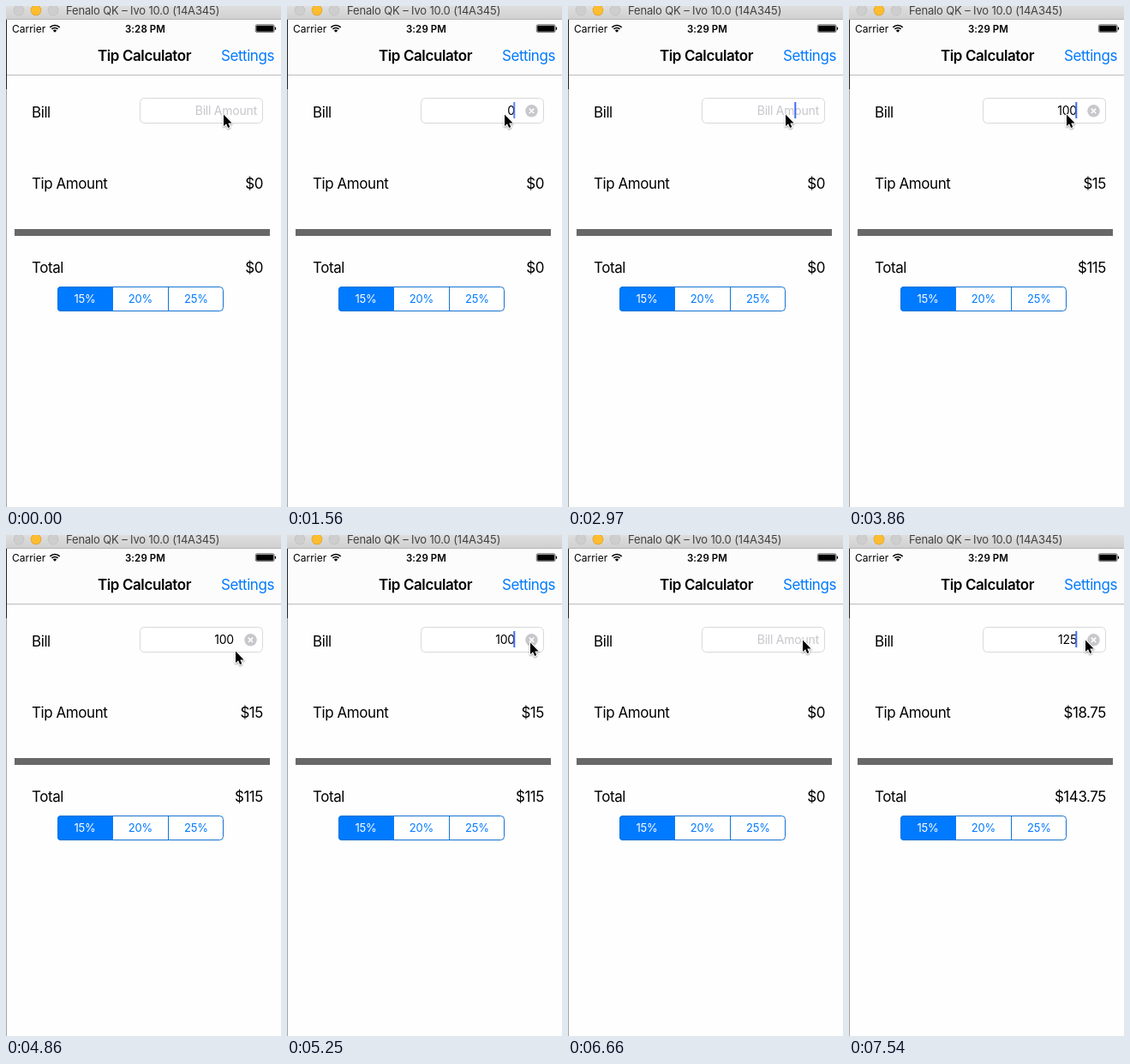
Recreate the animation shown at these times as an HTML page with a canvas. Size 321x584 px, loop 8000 ms.

```html
<!DOCTYPE html>
<html lang="en">
<head>
<meta charset="utf-8">
<title>Tip Calculator</title>
<style>
  html, body { margin: 0; width: 100%; height: 100%; overflow: hidden; background: #fff; }
  canvas { display: block; width: 321px; height: 584px; }
</style>
</head>
<body>
<canvas id="stage" width="321" height="584"></canvas>
<script>
const ctx = document.getElementById("stage").getContext("2d");
const LOOP = 8000;
const BLUE = "#007aff";

// Bill text over time: [start, typed]
const typing = [
  [0, ""], [1030, "0"], [2970, ""], [3080, "1"], [3260, "10"], [3800, "100"],
  [5950, ""], [6830, "1"], [7070, "12"], [7540, "125"]
];
// Caret opacity ramps: [start, end, opacity reached]
const blinks = [
  [0, 0, 0], [180, 270, 1], [650, 800, 0], [1030, 1030, 1], [1530, 1730, 0],
  [2050, 2130, 1], [2520, 2730, 0], [2970, 2970, 1], [4440, 4640, 0],
  [4980, 5070, 1], [5390, 5540, 0], [5850, 5950, 1], [6360, 6550, 0], [6830, 6830, 1]
];
// Pointer tip: [time, x, y]
const pointerPath = [
  [0, 253, 125], [4460, 253, 125], [4860, 267, 134], [5020, 271, 134],
  [5250, 283, 124], [5480, 286, 123], [6370, 286, 123],
  [6640, 273, 121], [6700, 273, 121], [6830, 275, 121], [LOOP, 275, 121]
];

function currentText(t) {
  return typing.filter(([start]) => start <= t).pop()[1];
}

function caretOpacity(t) {
  let level = 0;
  for (const [start, end, to] of blinks) {
    if (t < start) break;
    const k = end > start ? Math.min(1, (t - start) / (end - start)) : 1;
    level += (to - level) * k;
  }
  return level;
}

function pointerAt(t) {
  const i = Math.max(1, pointerPath.findIndex(([time]) => time > t));
  const [t0, x0, y0] = pointerPath[i - 1];
  const [t1, x1, y1] = pointerPath[i];
  const k = (t - t0) / (t1 - t0);
  return [Math.round(x0 + (x1 - x0) * k), Math.round(y0 + (y1 - y0) * k)];
}

function text(str, x, y, { size = 17, weight = 400, color = "#000", align = "left", track = -0.43 } = {}) {
  ctx.font = `${weight} ${size}px Inter, "Liberation Sans", sans-serif`;
  ctx.letterSpacing = track + "px";
  ctx.textAlign = align;
  ctx.fillStyle = color;
  ctx.fillText(str, x, y);
}

function rect(x, y, w, h, color) {
  ctx.fillStyle = color;
  ctx.fillRect(x, y, w, h);
}

function roundBox(x, y, w, h, r) {
  ctx.beginPath();
  ctx.roundRect(x, y, w, h, r);
}

function disc(x, y, r, color) {
  ctx.beginPath();
  ctx.arc(x, y, r, 0, Math.PI * 2);
  ctx.fillStyle = color;
  ctx.fill();
}

function drawTitleBar() {
  const shade = ctx.createLinearGradient(0, 0, 0, 15);
  shade.addColorStop(0, "#dedede");
  shade.addColorStop(1, "#d0d0d0");
  rect(0, 0, 321, 15, shade);
  rect(0, 15, 321, 1, "#b4b4b4");
  disc(15, 5, 6.3, "#c2c2c2");
  disc(15, 5, 5.5, "#cecece");
  disc(35, 5, 6.3, "#e0a02c");
  disc(35, 5, 5.6, "#fdbd2f");
  disc(55, 5, 6.3, "#c2c2c2");
  disc(55, 5, 5.5, "#cecece");
  text("Fenalo QK – Ivo 10.0 (14A345)", 70, 10, { size: 13, color: "#414141", track: -0.15 });
}

function drawStatusBar(t) {
  text("Carrier", 7, 31, { size: 12, track: 0 });
  text(t < 1030 ? "3:28 PM" : "3:29 PM", 162.5, 31, { size: 11.5, weight: 600, align: "center", track: 0.1 });

  // Wi-Fi
  ctx.strokeStyle = "#000";
  ctx.lineWidth = 1.7;
  for (const r of [5, 8]) {
    ctx.beginPath();
    ctx.arc(57, 30.5, r, -Math.PI * 0.75, -Math.PI * 0.25);
    ctx.stroke();
  }
  ctx.beginPath();
  ctx.moveTo(57, 30.8);
  ctx.arc(57, 30.8, 3, -Math.PI * 0.75, -Math.PI * 0.25);
  ctx.fillStyle = "#000";
  ctx.fill();

  // Battery
  ctx.lineWidth = 0.6;
  roundBox(291.3, 21.8, 21.8, 8.8, 1.8);
  ctx.stroke();
  roundBox(292.2, 22.7, 20, 7, 1);
  ctx.fill();
  rect(313.8, 24.7, 1.3, 3, "#000");
}

function drawClearButton(pressed) {
  disc(285.5, 122.3, 7.2, pressed ? "#1672d6" : "#c8c8cc");
  ctx.strokeStyle = "#fff";
  ctx.lineWidth = 1.5;
  ctx.beginPath();
  ctx.moveTo(282.8, 119.6);
  ctx.lineTo(288.2, 125);
  ctx.moveTo(288.2, 119.6);
  ctx.lineTo(282.8, 125);
  ctx.stroke();
}

function drawField(t, bill) {
  roundBox(156.5, 107.5, 143, 29, 5);
  ctx.fillStyle = "#fff";
  ctx.fill();
  ctx.strokeStyle = "#d8d8d8";
  ctx.lineWidth = 1;
  ctx.stroke();

  if (bill) {
    text(bill, 266, 127, { size: 14, align: "right", track: -0.2 });
    drawClearButton(t >= 5720 && t < 5950);
  } else {
    text("Bill Amount", 293, 127, { size: 14, color: "#c7c7cd", align: "right", track: -0.22 });
  }
  const atEdge = !bill && !(t >= 2970 && t < 3080);
  ctx.globalAlpha = caretOpacity(t);
  rect(atEdge ? 291 : 264.3, 112, 2, 19, "#426bf2");
  ctx.globalAlpha = 1;
}

function drawSegments() {
  roundBox(60.5, 327.5, 193, 28, 4);
  ctx.fillStyle = "#fff";
  ctx.fill();
  roundBox(60, 327, 65, 29, [4, 0, 0, 4]);
  ctx.fillStyle = BLUE;
  ctx.fill();
  ctx.strokeStyle = "#1473cf";
  ctx.lineWidth = 1;
  roundBox(60.5, 327.5, 193, 28, 4);
  ctx.stroke();
  rect(189, 328, 1, 27, "#1473cf");
  ["15%", "20%", "25%"].forEach((label, i) =>
    text(label, 92 + i * 65, 346, { size: 13, color: i ? BLUE : "#fff", align: "center", track: -0.2 }));
}

function drawPointer(x, y) {
  ctx.save();
  ctx.translate(x + 1, y + 1.5);
  ctx.beginPath();
  [[0, 0], [0, 13.6], [3.1, 10.7], [5.2, 15.5], [7.3, 14.6], [5.3, 9.9], [9.6, 9.9]]
    .forEach(([px, py]) => ctx.lineTo(px, py));
  ctx.closePath();
  ctx.lineJoin = "round";
  ctx.lineWidth = 2;
  ctx.strokeStyle = "#fff";
  ctx.shadowColor = "rgba(0,0,0,.4)";
  ctx.shadowBlur = 2;
  ctx.shadowOffsetY = 1;
  ctx.stroke();
  ctx.shadowColor = "transparent";
  ctx.fillStyle = "#000";
  ctx.fill();
  ctx.restore();
}

function draw(t) {
  const bill = currentText(t);
  const amount = Number(bill);
  const money = value => "$" + Number(value.toFixed(2));

  rect(0, 0, 321, 584, "#fefefe");
  rect(0, 16, 321, 64, "#fcfcfc");
  rect(0, 80, 321, 1, "#bcbcbc");
  drawTitleBar();
  drawStatusBar(t);
  rect(0, 16, 1, 81, "#242424");
  rect(0, 97, 1, 487, "#a4a4a4");

  text("Tip Calculator", 161.5, 64, { weight: 600, align: "center", track: -0.4 });
  text("Settings", 313, 64, { color: BLUE, align: "right" });
  text("Bill", 30, 130);
  text("Tip Amount", 30, 213);
  text("Total", 30, 311);
  text(money(amount * 0.15), 300, 213, { align: "right" });
  text(money(amount * 1.15), 300, 311, { align: "right" });
  rect(10, 260, 298, 8, "#686868");

  drawField(t, bill);
  drawSegments();
  drawPointer(...pointerAt(t));
}

const begin = performance.now();
function tick() {
  draw((performance.now() - begin) % LOOP);
  requestAnimationFrame(tick);
}
tick();
</script>
</body>
</html>
```
